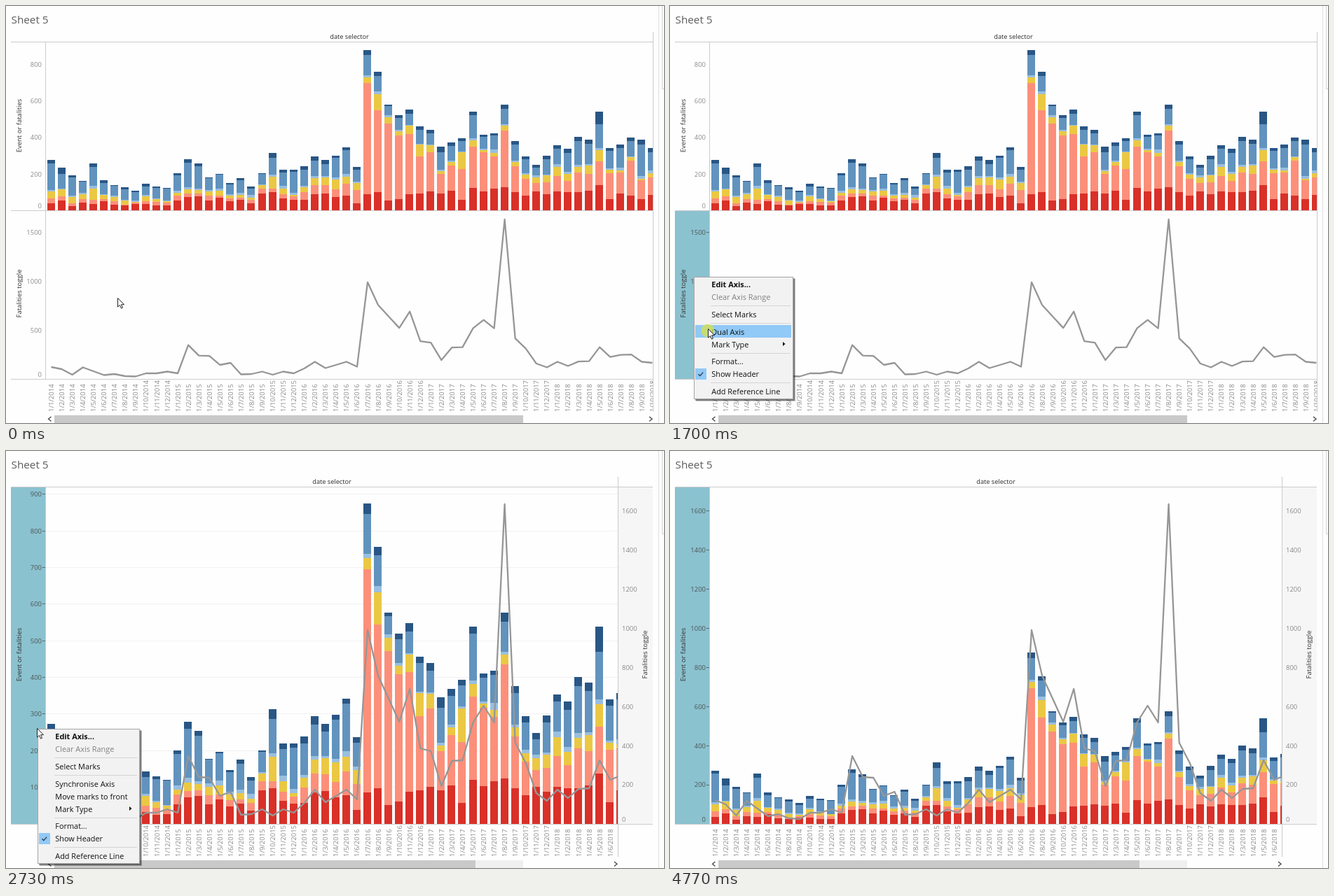
An HTML page that plays this animation: 939x596 px, repeating every 5.12 s.

```html
<!DOCTYPE html>
<html lang="en">
<head>
<meta charset="utf-8">
<title>Dual axis chart</title>
<style>
html, body { margin: 0; width: 100%; height: 100%; overflow: hidden; background: #fefefe; }
svg { display: block; width: 939px; height: 596px; font-family: "Open Sans", "Noto Sans", sans-serif; font-size: 9.5px; }
.crisp { shape-rendering: crispEdges; }
.menu { font-size: 10.9px; }
</style>
</head>
<body>
<svg id="stage" viewBox="0 0 939 596"></svg>
<script>
const LOOP = 5120, BASE = 533, STEP = 15.05;
const GREY = '#8a8a8a', DARK = '#333', RULE = '#cbcbcb';
const TEAL = '#8bc2cf', HOVER = '#f5f5f5', PICK = '#91c9f7';

// Cumulative stack heights per month, bottom layer first, in px on the tall plot
const layers = [
  ['#d93028', [19,28,12,21,18,26,15,13,17,17,13,14,28,38,40,28,35,25,29,19,48,51,33,29,30,45,47,38,41,
    20,45,51,27,32,46,48,53,48,55,30,63,54,61,65,51,41,53,46,53,51,51,55,72,31,48,42,31,43]],
  ['#fc8f7a', [34,39,20,31,30,32,26,16,21,26,23,21,42,47,48,41,42,34,35,30,61,61,46,39,52,72,71,60,75,
    57,364,285,247,214,217,154,165,104,127,117,182,166,153,228,125,89,77,80,97,84,108,104,139,106,108,141,86,94]],
  ['#ebc843', [53,60,38,45,61,43,38,27,24,40,31,26,49,59,57,53,55,42,44,36,72,96,61,44,66,92,94,88,96,
    77,380,331,266,226,242,187,186,112,138,165,200,172,163,242,138,101,94,99,124,103,123,127,171,116,114,151,90,105]],
  ['#99bfe0', [58,62,42,49,69,45,41,30,28,43,33,27,55,66,61,58,62,46,49,43,74,101,69,50,70,97,97,93,104,
    82,386,340,271,230,244,189,188,116,142,168,205,175,173,246,142,106,99,102,132,110,130,131,178,119,121,154,98,113]],
  ['#6193be', [134,103,93,82,123,77,70,60,51,67,64,62,100,136,126,92,101,74,86,62,103,150,107,109,115,142,132,149,172,
    116,443,384,297,264,275,230,219,166,183,198,272,209,213,289,187,145,121,145,175,163,197,190,246,169,178,198,188,166]],
  ['#295685', [143,121,99,84,134,85,72,65,56,75,68,63,105,146,133,93,103,77,92,67,105,164,115,115,125,154,143,156,179,
    124,458,396,302,272,287,239,230,181,193,206,282,215,219,302,197,154,130,155,185,175,210,202,282,178,187,208,201,178]]
];
const toll = [34,28,12,33,22,11,14,8,7,16,16,21,16,97,67,66,40,46,13,14,21,12,21,16,30,49,31,40,49,
  35,277,212,179,146,193,108,104,54,90,91,145,169,145,457,116,87,44,33,49,37,50,51,91,63,69,70,49,46];

const menus = {
  first: { x: 34, y: 387, w: 142, items: ['Edit Axis...', 'Clear Axis Range', '-', 'Select Marks', '-', 'Dual Axis',
    'Mark Type', '-', 'Format...', 'Show Header', '-', 'Add Reference Line'] },
  second: { x: 45, y: 397, w: 146, items: ['Edit Axis...', 'Clear Axis Range', '-', 'Select Marks', '-', 'Synchronise Axis',
    'Move marks to front', 'Mark Type', '-', 'Format...', 'Show Header', '-', 'Add Reference Line'] }
};

const steps = [
  { at: 0, view: 'split', cursor: [159, 417] },
  { at: 330, view: 'split', axis: HOVER, cursor: [25, 392] },
  { at: 670, view: 'split', axis: HOVER, cursor: [32, 386] },
  { at: 1020, view: 'split', axis: TEAL, menu: 'first', cursor: [36, 386] },
  { at: 1370, view: 'split', axis: TEAL, menu: 'first', pick: 'Select Marks', cursor: [53, 443] },
  { at: 1700, view: 'split', axis: TEAL, menu: 'first', pick: 'Dual Axis', cursor: [54, 461], click: [54, 464] },
  { at: 2030, view: 'merged', axis: TEAL, cursor: [42, 411] },
  { at: 2380, view: 'dual', axis: HOVER, cursor: [44, 408] },
  { at: 2730, view: 'dual', axis: TEAL, menu: 'second', cursor: [44, 396] },
  { at: 3060, view: 'dual', axis: TEAL, menu: 'second', cursor: [93, 463] },
  { at: 3410, view: 'dual', axis: TEAL, menu: 'second', cursor: [94, 463] },
  { at: 3740, view: 'dual', axis: TEAL, menu: 'second', pick: 'Synchronise Axis', cursor: [97, 476] },
  { at: 4090, view: 'dual', axis: TEAL, cursor: [97, 476] },
  { at: 4440, view: 'sync', axis: TEAL, cursor: [807, 580] },
  { at: 4770, view: 'sync', axis: TEAL }
];

const rect = (x, y, w, h, fill, more = '') =>
  `<rect class="crisp" x="${x}" y="${y}" width="${w}" height="${h}" fill="${fill}" ${more}/>`;
const hline = (x1, x2, y, color = RULE) => rect(x1, y, x2 - x1, 1, color);
const vline = (x, y1, y2, color = RULE) => rect(x, y1, 1, y2 - y1, color);
const text = (s, x, y, fill, more = '') => `<text x="${x}" y="${y}" fill="${fill}" ${more}>${s}</text>`;
const upright = (s, x, y, fill, anchor) =>
  `<text transform="translate(${x} ${y}) rotate(-90)" text-anchor="${anchor}" fill="${fill}">${s}</text>`;
const title = (s, x, y) => upright(s, x + 3, y, DARK, 'middle');
const midX = i => 64.5 + STEP * i;

function bars(base, scale) {
  let out = '';
  for (let i = 0; i < toll.length; i++) {
    let low = base;
    for (const [color, tops] of layers) {
      const y = Math.round(base - tops[i] * scale);
      out += rect(Math.round(midX(i) - 6), y, 11, low - y, color);
      low = y;
    }
  }
  return out;
}

function curve(scale) {
  const pts = toll.map((v, i) => `${midX(i).toFixed(1)},${(BASE - v * scale).toFixed(1)}`).join(' ');
  return `<polyline points="${pts}" fill="none" stroke="#969696" stroke-width="2.3" stroke-linejoin="round"/>`;
}

function dates(count) {
  let out = '';
  for (let i = 0; i < count; i++)
    out += upright(`1/${i % 12 + 1}/${2014 + Math.floor(i / 12)}`, midX(i) + 3.5, 580, GREY, 'start');
  return out;
}

// Scale labels from zero up; the zero label sits just above the base line
function scaleLabels(base, unit, step, top, o = {}) {
  let out = '';
  for (let v = 0; v <= top; v += step) {
    const y = base - (v ? v * unit : 6.5);
    out += o.right ? text(v, 879, y + 3.4, GREY)
      : text(v, 51, y + 3.4, o.on ? '#4c5558' : GREY, 'text-anchor="end"');
    if (o.on && v) out += hline(52, 56, Math.round(y - 0.5), '#59676b');
  }
  return out;
}

function scrollbar(end, arrow, wide) {
  const chevron = (x, d) => `<path d="M${x + d * 2} 587l${-d * 4} 3.2l${d * 4} 3.2" fill="none" stroke="#444" stroke-width="1.3"/>`;
  return (wide ? '' : rect(end, 585, 738 - end, 11, '#f0f0f0')) +
    rect(69, 585, end - 69, 11, '#c9c9c9') + chevron(62.5, 1) + chevron(arrow, -1);
}

function chart(s) {
  const split = s.view === 'split', merged = s.view === 'merged', sync = s.view === 'sync';
  const edge = split ? 923 : 873, far = merged ? 873 : 923;
  const wideLeft = s.view === 'dual' || sync;
  let out = text('Sheet 5', 7.5, 25, '#5c5c5c', 'font-size="15.3"') +
    text('date selector', wideLeft ? 465 : 490, 47.4, '#2b2b2b', 'text-anchor="middle" font-size="9.2" font-weight="500"');

  if (s.axis) out += wideLeft ? rect(7, 52, 50, 481, s.axis) : rect(7, 293, 50, 240, s.axis);
  if (wideLeft) {
    out += rect(874, 52, 49, 481, '#f6f6f6') + scaleLabels(BASE, 0.2797, 200, 1600, { right: true }) +
      title('Fatalities toggle', 912, 291) + title('Event or fatalities', 19, 291) +
      (sync ? scaleLabels(BASE, 0.2797, 200, 1600, { on: true }) : scaleLabels(BASE, 0.5235, 100, 900, { on: true }));
  } else {
    out += scaleLabels(292.5, 0.2617, 200, 800) + scaleLabels(BASE, 0.1395, 500, 1500, { on: !!s.axis }) +
      title('Event or fatalities', 19, 171) + title('Fatalities toggle', 19, 411);
  }
  if (merged || s.view === 'dual')
    for (let v = 100; v <= 900; v += 100) out += hline(57, edge, Math.round(BASE - v * 0.5235 - 0.5), '#f1f1f1');
  if (merged) out += '<path d="M7 52h14l-14 14z" fill="#a9d3bd"/><path d="M52 52.5h4v4" fill="none" stroke="#7fb79b"/>' +
    '<path d="M14 242.5h3M14 245.5h5M14 248.5h2M18.5 241v7M20.5 244.5h2M20.5 247.5h2" fill="none" stroke="#555" stroke-width="1.3"/>' +
    '<path d="M7 528v5h5" fill="none" stroke="#c9e3e8"/>';

  const clip = `<clipPath id="plot"><rect x="57" y="36" width="${edge - 57 + 1}" height="550"/></clipPath>`;
  out += hline(7, far, 51) + vline(56, 52, 533) + hline(7, far, 533);
  if (split) out += hline(7, 923, 292);
  out += clip + '<g clip-path="url(#plot)">' +
    (split ? bars(292, 0.501) : bars(BASE, sync ? 0.534 : 1)) +
    curve(split ? 0.499 : 1) + dates(split ? 58 : 54) + '</g>' + vline(edge, 37, 580);

  out += split ? scrollbar(738, 920, true) : scrollbar(670, 870);
  return out + vline(931, 0, 596, '#dedede') + vline(936, 0, 118, '#d4d4d4') + hline(936, 939, 118, '#d4d4d4');
}

function menuBox({ x, y, w, items }, pick) {
  let row = y + 11, body = '';
  for (const item of items) {
    if (item === '-') {
      body += hline(x + 24, x + w - 4, Math.round(row - 6), '#d5d5d5');
      row += 6.75;
      continue;
    }
    if (item === pick) body += rect(x + 1.5, Math.round(row - 9.5), w - 5, 18, PICK);
    if (item === 'Show Header')
      body += rect(x + 2, Math.round(row - 8.5), 16, 16, PICK) +
        `<path d="M${x + 6.5} ${row}l2.3 2.4l4.4-5" fill="none" stroke="#20303c" stroke-width="1.2"/>`;
    if (item === 'Mark Type') body += `<path d="M${x + w - 15} ${row - 3.5}l3.5 3l-3.5 3z" fill="#111"/>`;
    body += text(item, x + 25.3, row + 4, item === 'Clear Axis Range' ? '#808080' : '#111',
      item === 'Edit Axis...' ? 'font-weight="700"' : '');
    row += 18;
  }
  const h = Math.round(row - 18 + 11 - y);
  return '<g class="menu">' + rect(x + 3, y + 3, w, h, '#000', 'opacity=".25"') +
    rect(x + 2, y + 2, w, h, '#000', 'opacity=".35"') +
    rect(x, y, w, h, '#a5a5a5') + rect(x + 1, y + 1, w - 2, h - 2, '#f2f2f2') + body + '</g>';
}

const pointer = ([x, y]) =>
  `<path transform="translate(${x + 0.5} ${y + 0.5})" d="M0 0V12.6L2.9 9.9L5 14.6L7 13.7L5 9.2H9Z" fill="#fff" stroke="#222" stroke-width="1"/>`;

function draw(s) {
  let out = chart(s);
  if (s.menu) out += menuBox(menus[s.menu], s.pick);
  if (s.click) out += `<circle cx="${s.click[0]}" cy="${s.click[1]}" r="9.5" fill="#d8e04a" opacity=".75"/>`;
  if (s.cursor) out += pointer(s.cursor);
  return out;
}

const stage = document.getElementById('stage');
let shown = null;
function tick() {
  const t = performance.now() % LOOP;
  const now = steps.filter(s => s.at <= t).pop();
  if (now !== shown) stage.innerHTML = draw(shown = now);
  requestAnimationFrame(tick);
}
tick();
</script>
</body>
</html>
```
